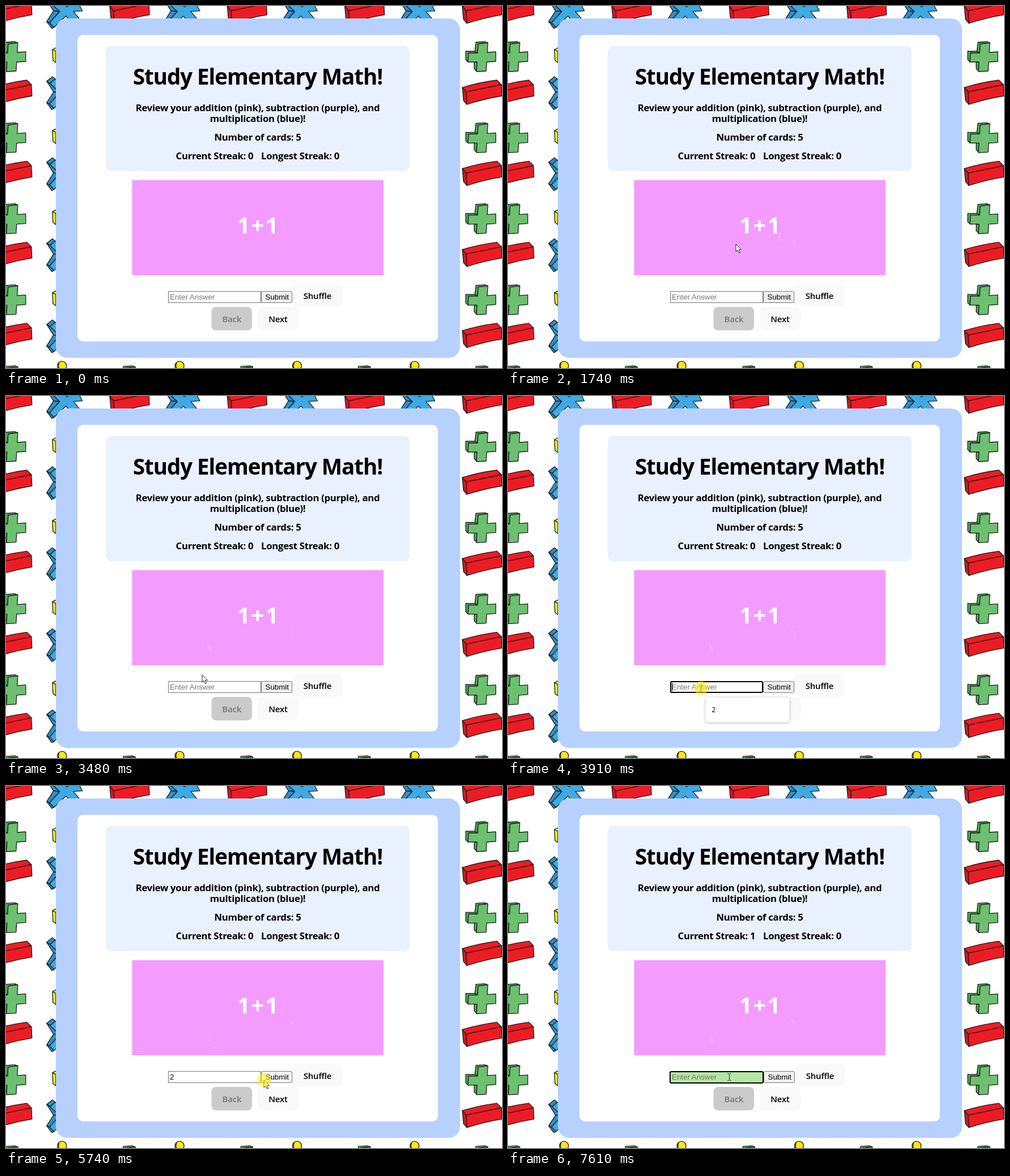
Animation, 875 px wide and 640 px high, one loop 8000 ms. Source, as an HTML page:

```html
<!DOCTYPE html>
<html lang="en">
<head>
<meta charset="utf-8">
<title>Study Elementary Math</title>
<style>
  html, body { margin: 0; width: 100%; height: 100%; overflow: hidden; background: #fff; }
  svg { display: block; width: 100vw; height: 100vh; }
  text { white-space: pre; }
  .ui { font-family: "Open Sans", "Noto Sans", sans-serif; text-anchor: middle; }
  .title { font-size: 38.5px; font-weight: 700; letter-spacing: -1.05px; }
  .info { font-size: 16.8px; font-weight: 700; letter-spacing: -.32px; }
  .sum { font-size: 40px; font-weight: 700; letter-spacing: 2px; fill: #fff; }
  .button { font-size: 15px; font-weight: 600; letter-spacing: -.2px; }
  .form { font: 13.33px "Liberation Sans", Arial, sans-serif; }
  .toy { stroke: #1d1d1d; stroke-width: 1.3; stroke-linejoin: round; }
  #popup { filter: drop-shadow(0 1px 2px rgba(0, 0, 0, .25)); }
</style>
</head>
<body>
<svg viewBox="0 0 875 640" preserveAspectRatio="none">
  <defs>
    <g id="toys" class="toy">
      <g fill="#ffe80f">
        <ellipse cx="138" cy="18" rx="8" ry="8"/>
        <path d="M133 13Q130 19 134 24" fill="none"/>
        <path d="M121 32L127 29L155 31V52L127 55L122 51Z"/>
        <path d="M121 32L127 35V55" fill="none"/>
      </g>
      <g fill="#4fa954">
        <path d="M39 19L55 18L60 20L43 22L42 38L37 36Z"/>
        <path d="M21 35L37 35L42 38H26L25 54L21 50Z"/>
        <path d="M36 54H41L40 70L36 66Z"/>
        <path fill="#6cc070" d="M43 22L60 20L59 37L74 36V53L58 54L57 70L40 71L41 54H25L26 38H42Z"/>
      </g>
      <g fill="#ed1c24">
        <path fill="#d9161e" d="M15 99L22 107L23 129L17 122Z"/>
        <path d="M15 99Q45 90 76 86L84 94L22 107Z"/>
        <path d="M22 107L84 94L85 114Q54 119 23 129Z"/>
      </g>
      <g fill="#2f8fc9">
        <path d="M121 80L126 84L117 92L111 88Z"/>
        <path d="M111 88L117 92L134 108L123 107Z"/>
        <path d="M123 107L134 108L116 128L111 126Z"/>
        <path d="M111 126L116 128L124 136L120 138Z"/>
        <path fill="#3fa9e3" d="M126 84L147 100L163 86L174 107L158 108L173 126L160 136L145 116L124 136L116 128L134 108L117 92Z"/>
      </g>
    </g>
    <path id="arrow" d="M0 0V13L3 10.5L5.5 15.5L7.6 14.5L5.3 9.8L9.2 9.4Z"/>
    <path id="beam" d="M-3 -6H-1L0 -5L1 -6H3M0 -5V5M-3 6H-1L0 5L1 6H3" fill="none"/>
  </defs>

  <g id="wallpaper"></g>
  <rect x="88" y="22" width="713" height="600" rx="20" fill="#b7d1ff"/>
  <rect x="126" y="51" width="636" height="542" rx="10" fill="#fff"/>
  <rect x="176" y="70.500" width="536" height="221.500" rx="10" fill="#e9f1ff"/>

  <g class="ui">
    <text class="title" x="444" y="139">Study Elementary Math!</text>
    <g class="info">
      <text x="444" y="186">Review your addition (pink), subtraction (purple), and</text>
      <text x="444" y="204.500">multiplication (blue)!</text>
      <text x="444" y="238">Number of cards: 5</text>
      <text id="streak" x="368" y="270.500">Current Streak: 0</text>
      <text x="519" y="270.500">Longest Streak: 0</text>
    </g>
  </g>

  <rect x="222.500" y="308" width="443.500" height="168" fill="#f39bff"/>
  <text id="question" class="ui sum" x="445" y="402">1+1</text>
  <g id="answer">
    <rect x="396" y="364" width="97" height="97" fill="#fff"/>
    <path fill="#fbbf45" stroke="#2b2118" stroke-width="2" d="M428 405C426 391 438 387 447 387C458 387 463 394 461 404C460 413 452 420 447 424H461Q464 424 463 429L462 436Q462 438 459 438L432 439Q429 439 429 436L430 429Q431 425 436 421C443 414 449 408 449 402C449 398 445 398 443 401Q442 406 439 407L431 408Q428 408 428 405Z"/>
    <path d="M432 399Q434 391 442 390" fill="none" stroke="#fff0c4" stroke-width="2.500" stroke-linecap="round"/>
  </g>
  <g fill="#fff" opacity=".14">
    <path id="trailA" d="M498 411L508 416V424L502 421Z"/>
    <path id="trailB" d="M354 436L363 446V451H357Z"/>
  </g>

  <g id="field">
    <rect id="box"/>
    <text id="value" class="form" x="289" y="518.500"></text>
    <path id="caret" stroke="#000"/>
  </g>
  <g id="row">
    <rect id="submit" x="450.500" y="504.500" width="54" height="20" rx="2.500" stroke="#767676"/>
    <text class="form" x="457.500" y="518.500">Submit</text>
    <rect x="505" y="491" width="88" height="41" rx="8" fill="#f9f9f9"/>
    <text class="ui button" x="549.500" y="518">Shuffle</text>
  </g>
  <g class="ui button">
    <rect x="362.500" y="532" width="71.500" height="41.500" rx="8" fill="#cbcbcb"/>
    <text x="398.500" y="559" fill="#757575">Back</text>
    <rect x="444" y="532" width="72" height="41.500" rx="8" fill="#f9f9f9"/>
    <text x="480" y="559">Next</text>
  </g>
  <g id="popup">
    <rect x="348.500" y="532.500" width="148" height="44.500" rx="5" fill="#fff" stroke="#e4e4e4" stroke-width=".5"/>
    <text class="ui" x="363" y="559" font-size="12">2</text>
  </g>

  <use id="trailBeam" href="#beam" x="478.500" y="408" stroke="#eadcf0"/>
  <g id="cursor">
    <use id="pointer" href="#arrow" fill="#fff" stroke="#222"/>
    <use id="textCursor" href="#beam" stroke="#222"/>
  </g>
  <circle id="click" r="12" fill="#fff000" opacity=".55"/>
</svg>

<script>
const LOOP = 8000;
const byId = id => document.getElementById(id);
const set = (id, attrs) => {
  for (const name in attrs) byId(id).setAttribute(name, attrs[name]);
};
const show = (id, visible) => set(id, { visibility: visible ? 'visible' : 'hidden' });

const tiles = [];
for (let row = 0; row < 6; row++)
  for (let col = 0; col < 5; col++)
    tiles.push(`<use href="#toys" x="${-39.2 + col * 207.3}" y="${-98.3 + row * 143.3}"/>`);
byId('wallpaper').innerHTML = tiles.join('');

// Each move visits its points in equal time steps, holding between them.
const moves = [
  { from: 1050, to: 1190, path: [[862, 635], [850, 632], [838, 630]] },
  { from: 1390, to: 1950, path: [[800, 606], [720, 556], [615, 485], [499, 411], [478, 408],
                                 [402, 421], [374, 424], [359, 424], [358, 424]] },
  { from: 3280, to: 3760, path: [[358, 425], [354, 436], [350, 463], [346, 493],
                                 [343, 508], [341, 514], [340, 517], [340.5, 516.5]] },
  { from: 5110, to: 5740, path: [[343, 517], [353, 521], [372, 529], [395, 535], [418, 535],
                                 [436, 531], [448, 525], [453, 521], [455, 520], [455, 520]] },
  { from: 6600, to: 7080, path: [[452, 522], [440, 527], [425, 527], [408, 522],
                                 [396, 517], [391, 515], [390.5, 514.5]] }
];
const clicks = [[1950, 2220], [2820, 3080], [3910, 4110], [5740, 6010], [7080, 7350]];

function cursorAt(t) {
  const move = moves.filter(m => t >= m.from).pop();
  if (!move) return null;
  const last = move.path.length - 1;
  const step = Math.floor((t - move.from + 10) / (move.to - move.from) * last);
  return move.path[Math.min(last, step)];
}

function drawField(t, hovered) {
  const submitted = t >= 6010;
  const focused = (t >= 3910 && t < 5740) || t >= 7080;
  const grow = submitted ? 1 : 0;
  const weight = focused || submitted ? 2 : 1;
  const stroke = focused ? '#000' : hovered ? '#4f4f4f' : '#767676';
  set('box', {
    x: 286 - grow + weight / 2, y: 504 + weight / 2,
    width: 164 + 2 * grow - weight, height: 21 + grow - weight,
    rx: focused ? 2 : 0, fill: submitted ? '#b5e6a2' : '#fff',
    stroke, 'stroke-width': weight
  });
  const typed = t >= 4440 && !submitted;
  byId('value').textContent = typed ? '2' : 'Enter Answer';
  set('value', { fill: typed ? '#000' : '#757575' });
  set('caret', { d: `M${typed ? 296.5 : 289.5} 507V522` });
  show('caret', focused && t < 7610);
  set('row', { transform: `translate(${grow} 0)` });
}

function draw(t) {
  const cursor = cursorAt(t);
  const [x, y] = cursor || [-50, -50];
  const over = (left, top, right, bottom) => x >= left && x <= right && y >= top && y <= bottom;
  const overField = over(286, 504, 450, 525);
  const overText = overField || over(410, 368, 480, 412);
  const clicking = clicks.some(([from, to]) => t >= from && t < to);

  set('cursor', { transform: `translate(${x} ${y})` });
  show('pointer', !overText);
  show('textCursor', overText);
  set('click', { cx: x, cy: y });
  show('click', clicking);
  show('trailA', t >= 1670);
  show('trailB', t >= 3410);
  show('trailBeam', t >= 1740 && t < 1810);

  const flipped = t >= 2220 && t < 3080;
  show('answer', flipped);
  show('question', !flipped);
  byId('streak').textContent = 'Current Streak: ' + (t >= 6010 ? 1 : 0);

  drawField(t, overField);
  const overSubmit = over(450, 504, 505, 525);
  set('submit', { fill: overSubmit ? (clicking ? '#f5f5f5' : '#e5e5e5') : '#efefef' });

  const fade = Math.max(0, Math.floor((t - 4440 + 5) / 68));
  show('popup', t >= 3910 && t < 4780);
  set('popup', { opacity: Math.max(0, 1 - fade / 5.6) });
}

const start = performance.now();
function tick() {
  draw((performance.now() - start) % LOOP);
  requestAnimationFrame(tick);
}
tick();
</script>
</body>
</html>
```
